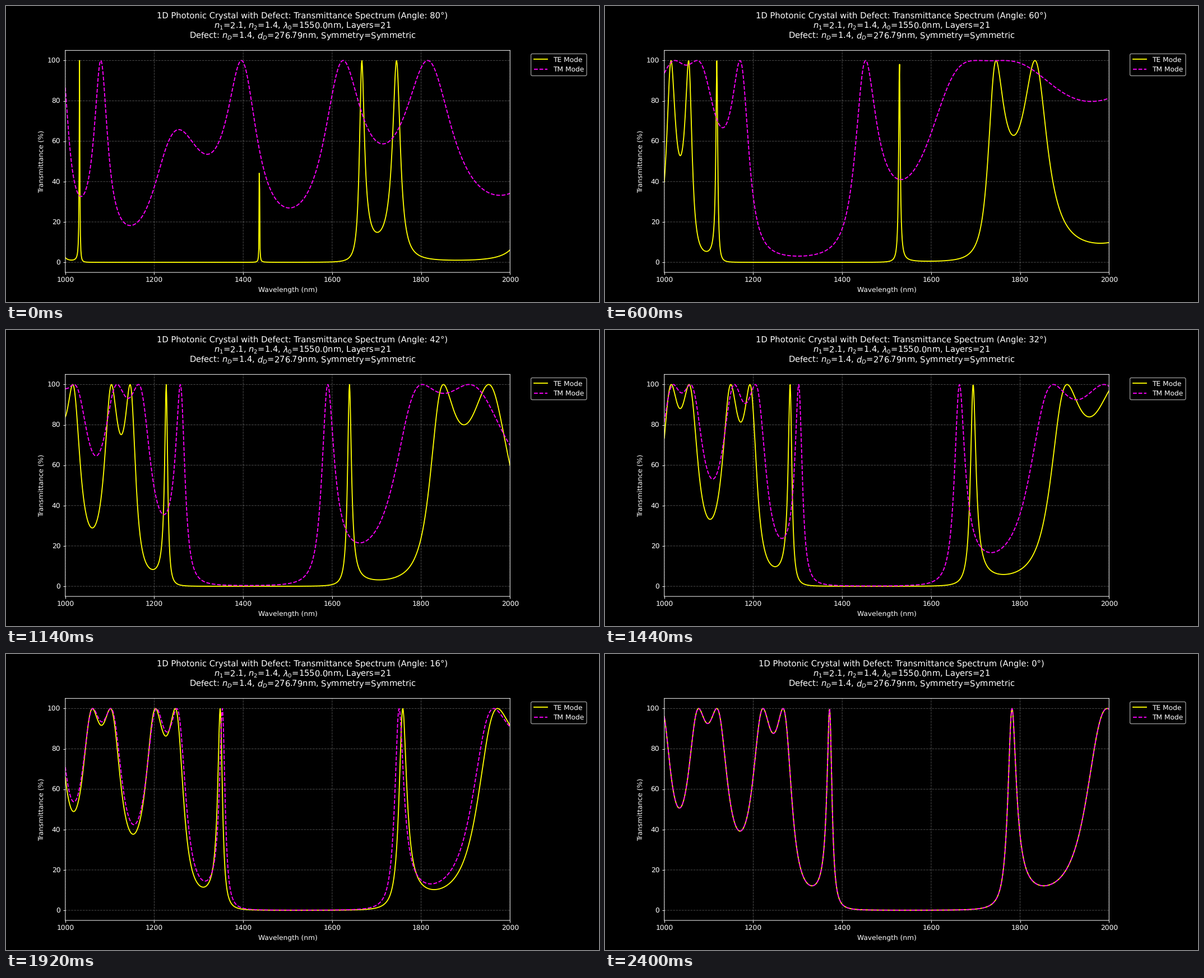
A matplotlib script that plays this animation: 1058x529 px, repeating every 2.46 s.

```python
import numpy as np
import matplotlib.pyplot as plt
from matplotlib.animation import FuncAnimation

WIDTH, HEIGHT = 1058, 529
DPI = HEIGHT / 6
INTERVAL = 60
ANGLES = np.arange(80, -1, -2)

N1, N2, N_DEFECT = 2.1, 1.4, 1.4
CENTER = 1550.0
LAYERS = 21
D1, D2 = CENTER / (4 * N1), CENTER / (4 * N2)
D_DEFECT = CENTER / (4 * N_DEFECT)

TITLE_BASELINES = (21.8, 39.4, 58.3)  # pixels from the top edge
TITLE_LINES = (
    "1D Photonic Crystal with Defect: Transmittance Spectrum (Angle: {}°)",
    f"$n_1$={N1}, $n_2$={N2}, $\\lambda_0$={CENTER}nm, Layers={LAYERS}",
    f"Defect: $n_D$={N_DEFECT}, $d_D$={D_DEFECT:.2f}nm, Symmetry=Symmetric",
)

wavelengths = np.linspace(1000, 2000, 1001)

# Alternating quarter-wave mirrors, mirrored around the central defect
mirror = [(N1, D1), (N2, D2)] * (LAYERS // 4)
stack = mirror + [(N_DEFECT, D_DEFECT)] + mirror[::-1]


def admittance(n, cos_t, mode):
    return n * cos_t if mode == "TE" else n / cos_t


def layer_matrix(n, d, sin_air, mode):
    cos_t = np.sqrt(1 - (sin_air / n) ** 2)
    eta = admittance(n, cos_t, mode)
    phase = 2 * np.pi * n * d * cos_t / wavelengths
    c, s = np.cos(phase), 1j * np.sin(phase)
    return np.moveaxis(np.array([[c, s / eta], [s * eta, c]]), -1, 0)


def transmittance(angle, mode):
    """Transmittance in percent of the stack in air, by transfer matrices."""
    theta = np.radians(angle)
    layers = {layer: layer_matrix(*layer, np.sin(theta), mode)
              for layer in set(stack)}
    total = np.eye(2)
    for layer in stack:
        total = total @ layers[layer]
    eta = admittance(1.0, np.cos(theta), mode)
    (a, b), (c, d) = np.moveaxis(total, 0, -1)
    t = 2 * eta / (eta * a + eta ** 2 * b + c + eta * d)
    return 100 * np.abs(t) ** 2


plt.style.use("dark_background")
plt.rcParams.update({"font.family": "DejaVu Sans", "text.hinting": "none"})

fig, ax = plt.subplots(figsize=(WIDTH / DPI, HEIGHT / DPI), dpi=DPI)
fig.subplots_adjust(left=0.1, right=0.85, bottom=0.1, top=0.85)

title, *_ = [fig.text(0.5, 1 - y / HEIGHT, text, size=12, ha="center")
             for y, text in zip(TITLE_BASELINES, TITLE_LINES)]

lines = {
    "TE": ax.plot([], [], color="yellow", label="TE Mode")[0],
    "TM": ax.plot([], [], color="magenta", ls="--", label="TM Mode")[0],
}
ax.set(xlim=(1000, 2000), ylim=(-5, 105),
       xlabel="Wavelength (nm)", ylabel="Transmittance (%)")
ax.grid(True, linestyle="--", alpha=0.3)
legend = ax.legend(loc="upper right", bbox_to_anchor=(1.18, 1))

# Keep straight lines at their exact subpixel positions
straight = [*ax.spines.values(), legend.get_frame()]
for axis in (ax.xaxis, ax.yaxis):
    straight += [*axis.get_gridlines(), *axis.get_ticklines()]
for artist in straight:
    artist.set_snap(False)


def update(i):
    angle = ANGLES[i]
    for mode, line in lines.items():
        line.set_data(wavelengths, transmittance(angle, mode))
    title.set_text(TITLE_LINES[0].format(angle))
    return [*lines.values(), title]


anim = FuncAnimation(fig, update, frames=len(ANGLES), interval=INTERVAL,
                     init_func=lambda: update(0), repeat=True, repeat_delay=0)
plt.show()
```
